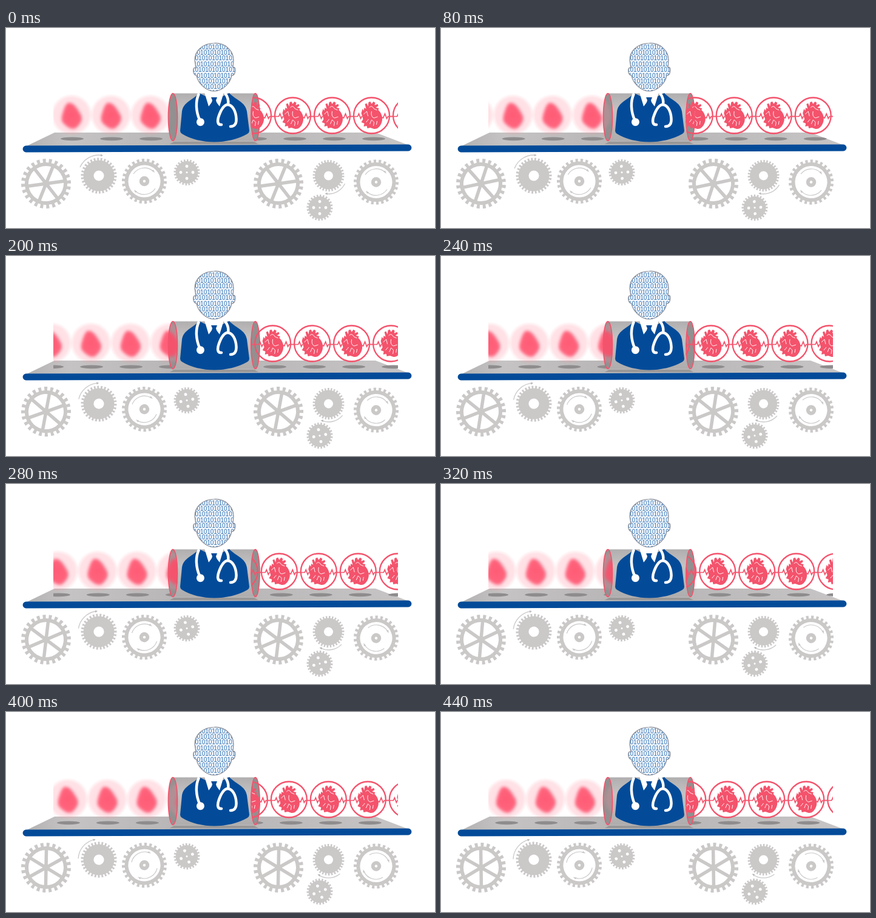
Animation of 707 by 329 pixels, one loop 480 ms. Source, as an HTML page:

```html
<!DOCTYPE html>
<html lang="en">
<head>
<meta charset="utf-8">
<title>Heart conveyor</title>
<style>
  @property --p { syntax: "<number>"; inherits: true; initial-value: 0; }
  html, body { margin: 0; width: 100%; height: 100%; overflow: hidden; background: #fff; }
  svg { display: block; width: 707px; height: 329px; animation: run 480ms infinite; }
  /* One step is 40 ms; the belt skips a step in the middle. */
  @keyframes run {
    0% { --p: 0; animation-timing-function: steps(5); }
    41.666% { --p: 5; animation-timing-function: steps(1); }
    41.667% { --p: 6; animation-timing-function: steps(7); }
    100% { --p: 13; }
  }
  .belt { transform: translateX(calc(var(--p) * 5.35px)); }
  .cw { transform: rotate(calc(var(--p) * 2.3deg)); }
  .ccw { transform: rotate(calc(var(--p) * -1.9deg)); }
  .gear { fill: #cbc8c8; stroke: #cbc8c8; }
  .line { fill: none; stroke: #f4536c; }
  .bits { font: 10px "Liberation Sans", Arial, sans-serif; fill: #3474b5; }
</style>
</head>
<body>
<svg viewBox="0 0 707 329">
  <defs>
    <linearGradient id="top" x2="1" y2="0">
      <stop stop-color="#b3b1b1"/><stop offset=".12" stop-color="#c5c3c3"/>
      <stop offset=".45" stop-color="#b5b3b3"/><stop offset="1" stop-color="#c7c5c5"/>
    </linearGradient>
    <linearGradient id="tube" x2="0" y2="1">
      <stop stop-color="#b0aeae"/><stop offset=".35" stop-color="#c4c2c2"/><stop offset="1" stop-color="#aeacac"/>
    </linearGradient>
    <radialGradient id="halo">
      <stop stop-color="#ff6d84" stop-opacity=".5"/><stop offset=".55" stop-color="#ff8fa1" stop-opacity=".28"/>
      <stop offset=".8" stop-color="#ff8fa1" stop-opacity=".26"/><stop offset="1" stop-color="#ff8fa1" stop-opacity="0"/>
    </radialGradient>
    <filter id="soft" x="-50%" y="-50%" width="200%" height="200%"><feGaussianBlur stdDeviation="2.800"/></filter>
    <clipPath id="inlet"><path d="M78 100H275V186H78ZM267 147a8 39 0 0 1 16 0a8 39 0 0 1-16 0"/></clipPath>
    <clipPath id="outlet"><path d="M411 100H646V190H411ZM403 147a8 39 0 0 1 16 0a8 39 0 0 1-16 0"/></clipPath>
    <clipPath id="floor"><path d="M78 172H275V190H78ZM411 172H646V190H411Z"/></clipPath>
    <path id="skull" d="M343 25C361 24 375 37 375 53L374 65C378 63 379 69 377 74Q376 78 372 78C370 91 356 104 343 104S316 91 314 78Q310 78 309 73C308 68 309 64 313 66L311 53C311 37 325 25 343 25Z"/>
    <clipPath id="face"><use href="#skull"/></clipPath>

    <ellipse id="spot" cy="182.300" rx="19" ry="2.900" fill="#8e8c8c"/>
    <g id="blur">
      <circle cy="143" r="35" fill="url(#halo)"/>
      <path d="M-36 145H36" stroke="#ff8297" stroke-width="13" opacity=".35" filter="url(#soft)"/>
      <path d="M-4 123C4 123 9 133 14 141C20 150 15 157 8 164C1 169-7 163-13 157C-19 151-15 143-13 136C-11 129-8 123-4 123Z" fill="#ff4866" opacity=".82" filter="url(#soft)"/>
    </g>
    <g id="heart">
      <circle class="line" cy="144" r="29.500" stroke-width="2.300"/>
      <path class="line" stroke-width="1.700" d="M-36 145.500H-23L-21 141L-18 149L-16 145M15 146L19 148L22 141L25 149L27 145.500H36"/>
      <path fill="#f4536c" d="M-17 140L-15 133L-13 136L-12 131L-9 133L-11 125L-8 124L-6 129L-5 122L-2 121L0 125L3 121L6 123L5 127L10 125L11 128L7 131L12 132L11 135C16 139 19 147 17 154C15 161 10 167 4 166L-2 164L-7 165L-8 161L-13 162L-12 157L-17 155L-14 150Z"/>
      <path d="M-13 142L-8 137L-6 145M-4 131Q0 126 4 133L9 135M0 137Q-2 146 4 148L10 146M-3 158L0 151L4 155L3 161M8 159L9 153M-9 155L-5 150" fill="none" stroke="#fff" stroke-width=".9"/>
    </g>

    <g id="wheel" class="gear">
      <circle r="32" fill="none" stroke-width="6"/>
      <circle r="37.500" fill="none" stroke-width="7" pathLength="48" stroke-dasharray="1"/>
      <path d="M0-31V31M-26.800-15.500L26.800 15.500M-26.800 15.500L26.800-15.500" stroke-width="5.500"/>
      <circle r="6" stroke="none"/>
    </g>
    <g id="cog" class="gear">
      <circle r="17" fill="none" stroke-width="17"/>
      <circle r="27" fill="none" stroke-width="5" pathLength="60" stroke-dasharray="1"/>
    </g>
    <g id="ring" class="gear">
      <circle r="29.500" fill="none" stroke-width="6"/>
      <circle r="34" fill="none" stroke-width="6" pathLength="52" stroke-dasharray="1"/>
      <circle r="5.200" fill="none" stroke-width="6"/>
      <path d="M-18-12A22 22 0 0 1 14-17M18 12A22 22 0 0 1-14 17" fill="none" stroke-width="1.200"/>
      <path d="M17-14L12-17L15-19ZM-17 14L-12 17L-15 19Z" stroke="none"/>
    </g>
    <g id="disc" class="gear">
      <circle r="18.500" stroke="none"/>
      <circle r="19.500" fill="none" stroke-width="4" pathLength="48" stroke-dasharray="1"/>
      <g fill="#fff" stroke="none">
        <circle r="1.500"/><circle cx="10" r="2.400"/><circle cx="-10" r="2.400"/><circle cy="10" r="2.400"/><circle cy="-10" r="2.400"/>
      </g>
    </g>
  </defs>

  <path d="M80 172H609L667 194L28 197Z" fill="url(#top)"/>
  <g clip-path="url(#floor)"><g id="spots" class="belt"></g></g>
  <path d="M33 199L663 197" stroke="#034b99" stroke-width="10.800" stroke-linecap="round"/>

  <path d="M275 107.500H411A7.500 39 0 0 1 411 185.500H275A7.500 39 0 0 1 275 107.500Z" fill="url(#tube)"/>
  <path d="M277 187H409L416 191H270Z" fill="#999797"/>
  <g fill="#929090"><ellipse cx="275" cy="146.500" rx="7.500" ry="39"/><ellipse cx="411" cy="146.500" rx="7" ry="39"/></g>
  <g clip-path="url(#inlet)"><g id="blurs" class="belt"></g></g>
  <g clip-path="url(#outlet)"><g id="hearts" class="belt"></g></g>
  <g class="line" stroke-width="1.700"><ellipse cx="275" cy="146.500" rx="7.500" ry="39"/><ellipse cx="411" cy="146.500" rx="7" ry="39"/></g>

  <path d="M318 107L343 119L368 107C379 119 394 121 397 137L401 169Q401 172 398 174C366 192 320 192 290 174Q287 172 287 169L290 137C293 121 308 119 318 107Z" fill="#034b99"/>
  <path d="M327 106H359L352 129L343 117L334 129Z" fill="#fff"/>
  <path d="M338 114H348L346 119L350 132L343 140L336 132L340 119Z" fill="#034b99"/>
  <g fill="none" stroke="#fff" stroke-width="4.500" stroke-linecap="round">
    <path d="M317.500 109C312 121 313 137 319 151M361.500 108C366 114 367 120 366 126M355 159C348 160 348 152 351 144C355 133 360 126 366 126C374 127 379 138 379.500 149C380 157 377 162 370 162"/>
  </g>
  <circle cx="320.400" cy="154.700" r="6.500" fill="#fff"/>
  <use href="#skull" fill="#f1f6fc"/>
  <g id="bits" class="bits" clip-path="url(#face)"></g>
  <use href="#skull" fill="none" stroke="#858994" stroke-width="1.200"/>

  <g transform="translate(66 256) rotate(22)"><use href="#wheel" class="ccw"/></g>
  <g transform="translate(153 243)"><g class="ccw">
    <use href="#cog"/>
    <path d="M-31-14A34 34 0 0 1 5-33.600" class="gear" style="fill:none" stroke-width="1.300"/>
    <path d="M7-33.500L3-35.500L3-31.500Z" fill="#bab8b8"/>
  </g></g>
  <g transform="translate(228 252)"><use href="#ring" class="ccw"/></g>
  <g transform="translate(298 237.500)"><use href="#disc" class="ccw"/></g>
  <g transform="translate(449 256) rotate(22)"><use href="#wheel" class="ccw"/></g>
  <g transform="translate(531.500 243)"><g class="cw">
    <use href="#cog" transform="scale(.88)"/>
    <path d="M27 13A30 30 0 0 1-4 29.700" class="gear" style="fill:none" stroke-width="1.300"/>
    <path d="M-6 29.500L-2 27.500L-1.500 31.500Z" fill="#bab8b8"/>
  </g></g>
  <g transform="translate(517 295.500)"><use href="#disc" class="ccw"/></g>
  <g transform="translate(610 253.500)"><use href="#ring" class="cw"/></g>
</svg>
<script>
  const fill = (id, html) => document.getElementById(id).innerHTML = html;
  const row = (name, x, n) =>
    Array.from({ length: n }, (_, i) => `<use href="#${name}" x="${x + i * 65}"/>`).join("");

  fill("spots", row("spot", 44, 4) + row("spot", 346, 5));
  fill("blurs", row("blur", 43, 4));
  fill("hearts", row("heart", 342.5, 6));
  fill("bits", Array.from({ length: 9 }, (_, i) =>
    `<text x="${306 + i % 2 * 3}" y="${34.5 + i * 9.4}">${"10".repeat(8)}</text>`).join(""));
</script>
</body>
</html>
```
